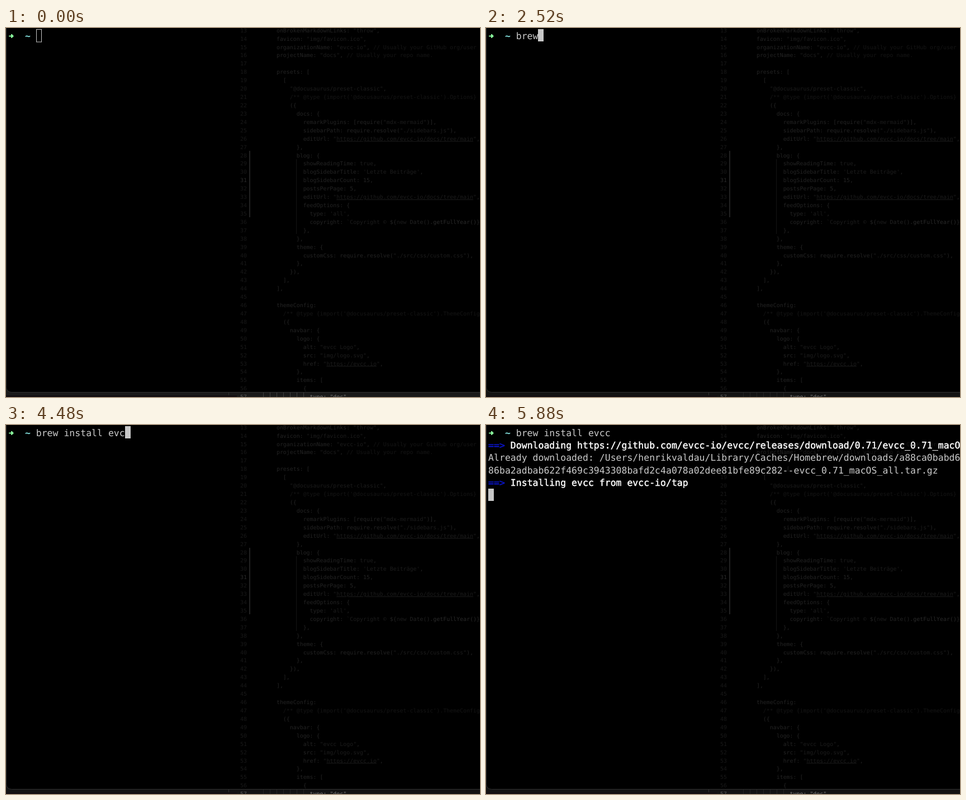
These frames come from a looping animation (848 px wide and 661 px high, 8 s). An HTML page:

```html
<!DOCTYPE html>
<html lang="en">
<head>
<meta charset="utf-8">
<title>Terminal install</title>
<style>
html, body { margin: 0; width: 100%; height: 100%; overflow: hidden; background: #000; }
svg { display: block; width: 848px; height: 661px; }
text { font-family: "DejaVu Sans Mono", "Liberation Mono", monospace; white-space: pre; text-rendering: geometricPrecision; }
#code text, #below text { font-size: 9.91px; }
#code { fill: #232323; }
#code .num { fill: #181818; }
#code .now { fill: #2a2a2a; }
#code .str { fill: #1c1c1c; }
#code .note { fill: #151515; }
#code .call { fill: #2a2a2a; }
#code .link { text-decoration: underline #191919 .8px; text-underline-offset: 1.6px; }
#term text { font-size: 16.5px; fill: #cbcbcb; }
#term .strong { fill: #fff; stroke: #fff; stroke-width: .45; }
#term .mark { fill: #0a14c8; stroke: #0a14c8; stroke-width: .45; }
#term .tilde { fill: #86e6e2; font-weight: bold; }
</style>
</head>
<body>
<svg viewBox="0 0 848 661" xmlns="http://www.w3.org/2000/svg">
  <rect width="848" height="661" fill="#000"/>
  <g id="below">
    <rect id="strip" y="640" width="848" height="21"/>
    <rect y="658" width="413" height="3" fill="#130e11"/>
    <path id="guides" stroke-width="1"/>
    <path d="M398.5 653V658" stroke="#303030"/>
    <text x="419" y="664.2" fill="#555">57</text>
    <text x="543.6" y="664.2" fill="#777">type: "doc",</text>
  </g>
  <path d="M.5 -2V642.5Q.5 652.5 10.5 652.5H850V-2Z" fill="#000" stroke="#303030"/>
  <g id="code">
    <path d="M436 220V339" stroke="#222" stroke-width="2"/>
    <path d="M519.5 235V369" stroke="#151515"/>
  </g>
  <g id="term">
    <path d="M6 14.4H11M9.9 11.8L12.7 14.4L9.9 17Z" fill="#8af59c" stroke="#8af59c" stroke-width="2" stroke-linecap="round" stroke-linejoin="round"/>
    <g id="rows"></g>
    <rect id="cursor"/>
  </g>
</svg>
<script id="listing" type="text/plain">
  onBrokenMarkdownLinks: "throw",
  favicon: "img/favicon.ico",
  organizationName: "evcc-io", // Usually your GitHub org/user name.
  projectName: "docs", // Usually your repo name.

  presets: [
    [
      "@docusaurus/preset-classic",
      /** @type {import('@docusaurus/preset-classic').Options} */
      ({
        docs: {
          remarkPlugins: [require("mdx-mermaid")],
          sidebarPath: require.resolve("./sidebars.js"),
          editUrl: "https://github.com/evcc-io/docs/tree/main",
        },
        blog: {
          showReadingTime: true,
          blogSidebarTitle: 'Letzte Beiträge',
          blogSidebarCount: 15,
          postsPerPage: 5,
          editUrl: "https://github.com/evcc-io/docs/tree/main",
          feedOptions: {
            type: 'all',
            copyright: `Copyright © ${new Date().getFullYear()} evcc.io`,
          },
        },
        theme: {
          customCss: require.resolve("./src/css/custom.css"),
        },
      }),
    ],
  ],

  themeConfig:
    /** @type {import('@docusaurus/preset-classic').ThemeConfig} */
    ({
      navbar: {
        logo: {
          alt: "evcc Logo",
          src: "img/logo.svg",
          href: "https://evcc.io",
        },
        items: [
          {
</script>
<script>
const NS = "http://www.w3.org/2000/svg";
const LOOP = 8000;
const CELL = 9.933, ROW = 22.3, LEFT = 4.1;
const CODE_CELL = 5.966, CODE_ROW = 14.92;
const $ = id => document.getElementById(id);

function setAll(el, attrs) {
  for (const key in attrs) el.setAttribute(key, attrs[key]);
}

function add(parent, tag, attrs, content = "") {
  const el = document.createElementNS(NS, tag);
  setAll(el, attrs);
  el.textContent = content;
  parent.append(el);
  return el;
}

// Editor behind the translucent terminal
const TOKEN = /(\/\/.*|\/\*.*)|("[^"]*"|'[^']*'|`[^$]*|\b(?:true|new)\b)|(\.getFullYear\(\))|(\w+|.)/g;

function drawLine(source, i) {
  const y = 7.7 + i * CODE_ROW, number = 13 + i;
  add($("code"), "text", { x: 419, y, class: number === 31 ? "now" : "num" }, number);
  const body = source.trimStart();
  if (!body) return;
  const x = 472 + (source.length - body.length) * CODE_CELL;
  const line = add($("code"), "text", { x, y });
  for (const [part, note, str, call] of body.matchAll(TOKEN)) {
    const kind = note ? "note" : str ? "str" : call ? "call" : "";
    if (part.startsWith('"https')) {
      add(line, "tspan", { class: kind }, '"');
      add(line, "tspan", { class: kind + " link" }, part.slice(1, -1));
      add(line, "tspan", { class: kind }, '"');
    } else {
      add(line, "tspan", { class: kind }, part);
    }
  }
}
$("listing").textContent.replace(/^\n|\n$/g, "").split("\n").forEach(drawLine);

let guidePath = "";
for (let x = 460.5; x < 535; x += 12) guidePath += `M${x} 653V661`;
$("guides").setAttribute("d", guidePath);

// Terminal content
const COMMAND = "brew install evcc";
const KEY_TIMES = [2100, 2240, 2310, 2520, 2870, 3150, 3220, 3290, 3360,
  3500, 3570, 3780, 3920, 4060, 4200, 4480, 4550];
const FOCUS = 1260, ENTER = 4900;

const cellX = col => LEFT + col * CELL;
const put = (row, col, content, kind = "") =>
  add($("rows"), "text", { x: cellX(col), y: 19.8 + row * ROW, class: kind }, content);

put(0, 3, "~", "tilde");
const typed = put(0, 5, "");

const output = [
  { at: 5530, row: 1, mark: true, text: "Downloading https://github.com/evcc-io/evcc/releases/download/0.71/evcc_0.71_macOS_all.tar.gz" },
  { at: 5810, row: 2, text: "Already downloaded: /Users/henrikvaldau/Library/Caches/Homebrew/downloads/a88ca0babd6" },
  { at: 5810, row: 3, text: "86ba2adbab622f469c3943308bafd2c4a078a02dee81bfe89c282--evcc_0.71_macOS_all.tar.gz" },
  { at: 5880, row: 4, mark: true, text: "Installing evcc from evcc-io/tap" }
];
for (const line of output) {
  line.parts = line.mark
    ? [put(line.row, 0, "==>", "mark"), put(line.row, 4, line.text, "strong")]
    : [put(line.row, 0, line.text)];
}

// The cursor sits on whole pixels
function placeCursor(row, col, solid) {
  const inset = solid ? 0 : 0.5;
  setAll($("cursor"), {
    x: Math.round(cellX(col)) + inset,
    y: Math.round(2.4 + row * ROW) + inset,
    width: 10 - 2 * inset,
    height: 22 + inset,
    fill: solid ? "#c7c7c7" : "none",
    stroke: solid ? "none" : "#c7c7c7"
  });
}

function render(t) {
  const focused = t >= FOCUS;
  $("strip").setAttribute("fill", focused ? "#131313" : "#1a1a1a");
  $("guides").setAttribute("stroke", focused ? "#242424" : "#404040");

  const count = KEY_TIMES.filter(at => t >= at).length;
  typed.textContent = COMMAND.slice(0, count);

  let row = t >= ENTER ? 1 : 0;
  for (const line of output) {
    const shown = t >= line.at;
    if (shown) row = line.row + 1;
    for (const part of line.parts) part.setAttribute("visibility", shown ? "visible" : "hidden");
  }
  placeCursor(row, row ? 0 : 5 + count, focused);
}

const start = performance.now();
function tick() {
  render((performance.now() - start) % LOOP);
  requestAnimationFrame(tick);
}
render(0);
requestAnimationFrame(tick);
</script>
</body>
</html>
```
